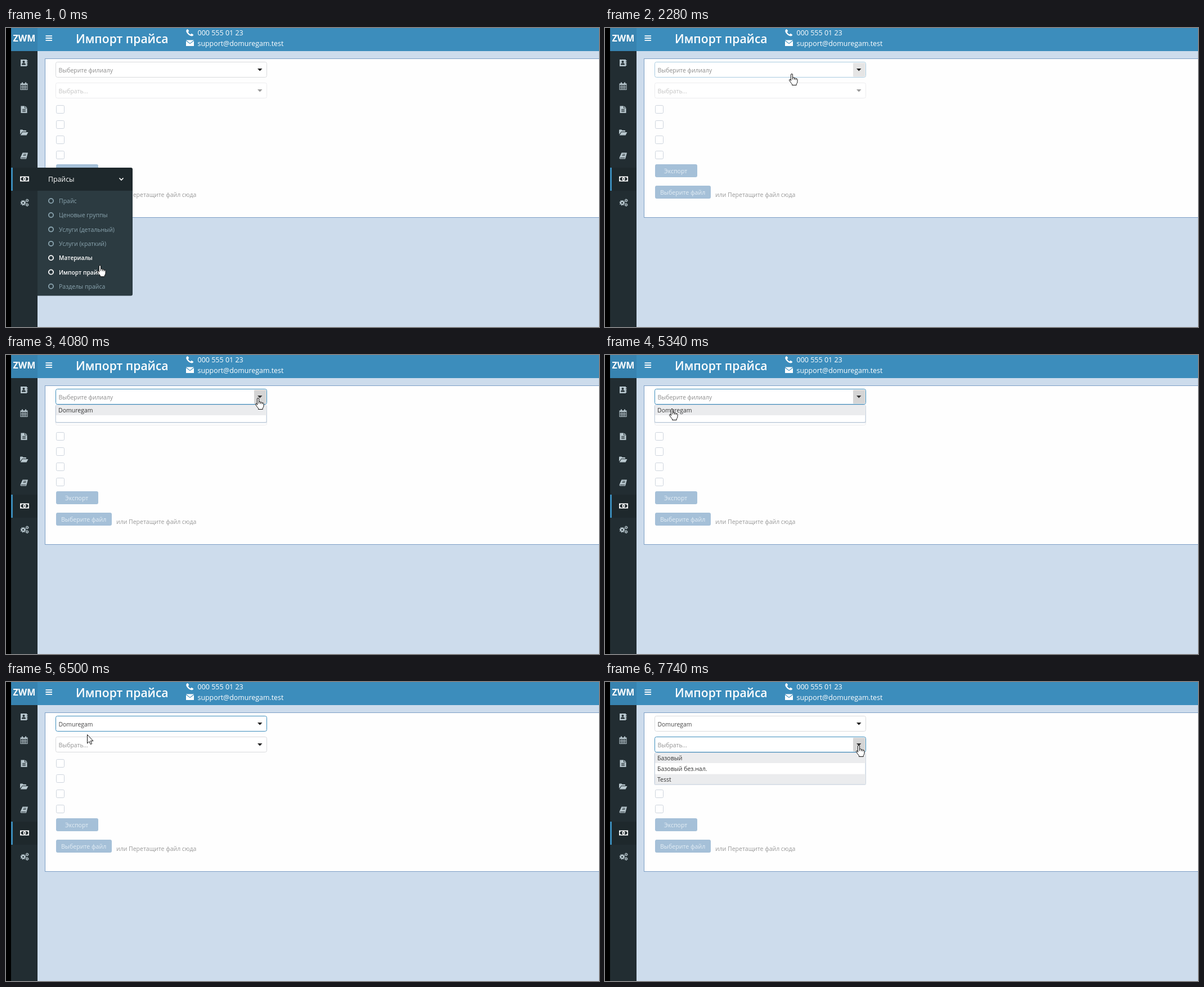
These frames come from a looping animation (1054x531 px, 8 s). An HTML page:

```html
<!DOCTYPE html>
<html lang="ru">
<head>
<meta charset="utf-8">
<title>Импорт прайса</title>
<style>
html, body { margin: 0; width: 100%; height: 100%; overflow: hidden; background: #cddcec; }
svg { display: block; width: 1054px; height: 531px; font-family: 'Open Sans', 'Noto Sans', sans-serif; }
text { white-space: pre; }
</style>
</head>
<body>
<svg id="stage" viewBox="0 0 1054 531"></svg>
<script>
const LOOP = 8000;
const BLUE = '#3c8dbc', DARK = '#222d32', DARKER = '#1e282c', PALE = '#b8c7ce', BORDER = '#d9dadd';
const BRANCH = 'Domuregam';

const rect = (x, y, w, h, fill, extra = '') =>
  `<rect x="${x}" y="${y}" width="${w}" height="${h}" fill="${fill}" ${extra}/>`;
const text = (x, y, size, fill, str, extra = '') =>
  `<text x="${x}" y="${y}" font-size="${size}" fill="${fill}" ${extra}>${str}</text>`;
const group = (id, body) => `<g id="${id}">${body}</g>`;

// Icons sit on a 14 by 14 grid; "bg" is the colour of the cut-out details.
const icons = {
  contacts: bg => `<path d="M1 1h11v12H1zM12 2.5h1.5v2H12zM12 6h1.5v2H12zM12 9.500h1.500v2H12z"/>
    <g fill="${bg}"><circle cx="6.500" cy="5" r="2"/><path d="M3 10.500q0-3 2-3h3q2 0 2 3z"/></g>`,
  calendar: bg => `<path d="M.5 2.500h13V14H.5zM3 .5h2v3H3zM9 .5h2v3H9z"/>
    <path d="M1.500 5h11v8h-11z" fill="${bg}"/><path d="M4.200 5v8M7 5v8M9.800 5v8M1.500 7.700h11M1.500 10.400h11" stroke="${PALE}" stroke-width=".9"/>`,
  page: bg => `<path d="M1.500 1H8v4h4.500v8.500h-11zM9 1l3.500 3.200H9z"/>
    <path d="M4 7h6M4 9h6M4 11h6" stroke="${bg}"/>`,
  folder: () => `<path d="M0 10.500V3q0-1 1-1h3.500l1 1.300H10q1 0 1 1V5.500H4zM.800 12l3.400-5.500H14.500L11.500 12z"/>`,
  book: bg => `<path d="M4.500 1.500H14L11 12.500H1.500Q0 12 .7 10z"/>
    <path d="M6 4.300h5M5.400 6.500h5M1.700 10.700H10.300" stroke="${bg}"/>`,
  money: bg => `<path d="M-1 2.500h16v9H-1z"/><path d="M2 4h10q0 1.500 1.500 1.500v3q-1.500 0-1.500 1.500H2q0-1.500-1.500-1.500v-3Q2 5.500 2 4z" fill="${bg}"/>
    <ellipse cx="7" cy="7" rx="2.600" ry="3"/><path d="M7 5.200v3.600" stroke="${bg}" stroke-width="1.200"/>`,
  gears: () => `<g fill="none" stroke="${PALE}"><circle cx="4.500" cy="7.500" r="2.600" stroke-width="2.200"/>
    <circle cx="4.500" cy="7.500" r="4.200" stroke-width="1.400" stroke-dasharray="1.650"/>
    <circle cx="11.600" cy="3.400" r="1.700" stroke-width="1.300"/><circle cx="11.600" cy="3.400" r="2.600" stroke-dasharray="1.360"/>
    <circle cx="11.600" cy="11" r="1.700" stroke-width="1.300"/><circle cx="11.600" cy="11" r="2.600" stroke-dasharray="1.360"/></g>`
};
const icon = (name, cx, cy, color = PALE, bg = DARK) =>
  `<g transform="translate(${cx - 7} ${cy - 7})" fill="${color}">${icons[name](bg)}</g>`;

function header() {
  return rect(0, 0, 1054, 41, BLUE) + rect(9, 0, 47, 41, '#3783b0') +
    text(12.5, 23.5, 16, '#fff', 'ZWM', 'font-weight="700"') +
    '<path d="M70.500 14.200h11.500M70.500 18h11.500M70.500 21.800h11.500" stroke="#fff" stroke-width="1.800"/>' +
    text(124, 27, 21.1, '#fff', 'Импорт прайса', 'font-weight="600"') +
    '<path d="M323 2l2.300 3.200-1.700 2q1.500 3 4.200 4.200l2-1.700 3.200 2.100q.5 2-2.800 2.600-3.700 0-7.200-3.800T320.500 4q.500-1.700 2.500-2z" fill="#fff"/>' +
    '<path d="M320 21.500h14l-7 5.500zM320 23l7 5.200 7-5.200v9h-14z" fill="#fff"/>' +
    text(340.5, 13, 12.5, '#fff', '000 555 01 23') +
    text(340.5, 32, 12.4, '#fff', 'support@domuregam.test');
}

function sidebar() {
  const rows = [['contacts', 62], ['calendar', 103], ['page', 144.5], ['folder', 185.5], ['book', 227]];
  return rect(0, 0, 9, 531, '#000') + rect(9, 41, 47, 490, DARK) +
    rect(9, 248, 47, 41, DARKER) + rect(9, 248, 3, 41, BLUE) +
    rows.map(([name, y]) => icon(name, 32, y)).join('') +
    icon('money', 33, 268, '#fff', DARKER) + icon('gears', 33, 310);
}

function select(id, y, placeholder) {
  return group(id,
    rect(88.5, y + .5, 375, 27, '#fff', `class="frame" rx="3" stroke="${BORDER}"`) +
    rect(441, y + 2, 21.5, 24.5, 'none', 'class="button" rx="1"') +
    `<path class="arrow" d="M447 ${y + 12}h8.500l-4.250 4.500z"/>` +
    text(93.500, y + 18.700, 10.400, '#8d8d8d', placeholder, 'class="value"'));
}

function panel() {
  const boxes = [137, 164, 191, 218].map(y =>
    rect(89.5, y + .5, 14, 14, '#fff', 'rx="2" stroke="#cdd4dd"')).join('');
  const button = (y, w, x, label) =>
    rect(89, y, w, 23, '#a5c0d8', 'rx="3"') + text(x, y + 16, 10.6, '#e4edf5', label);
  return rect(69.5, 54.5, 1000, 282, '#fefefe', 'stroke="#7d9fc6"') +
    select('branch', 60, 'Выберите филиалу') + select('price', 97, 'Выбрать...') + boxes +
    button(242, 75, 105, 'Экспорт') + button(280, 99, 98, 'Выберите файл') +
    text(196, 300, 10.5, '#999', 'или Перетащите файл сюда');
}

function popup(id, y, h, items, shaded) {
  const rows = items.map((label, i) => {
    const top = y + 1 + i * 18.8;
    return (shaded.includes(i) ? rect(89, top, 374, 18, '#ebecee') : '') +
      text(93, top + 13, 10.5, '#333', label);
  }).join('');
  return group(id, rect(87.5, y + 1, 376.5, h, '#b9c6d6', 'class="shade" rx="2" opacity=".55"') +
    rect(88.5, y + .5, 374.5, h - 1, '#fff', 'class="box" rx="2" stroke="#c3cfdd"') + `<g class="rows">${rows}</g>`);
}

const ITEMS = ['Прайс', 'Ценовые группы', 'Услуги (детальный)', 'Услуги (краткий)',
  'Материалы', 'Импорт прайса', 'Разделы прайса'];
function menu() {
  const rows = ITEMS.map((label, i) => {
    const y = 307 + i * 25.3;
    return `<g class="item"><circle cx="80" cy="${y}" r="4.100" fill="none" stroke-width="1.800"/>` +
      text(94, y + 4, 10.5, '', label) + '</g>';
  }).join('');
  return group('menu',
    '<path d="M56 248h166q3 0 3 3v38H56z" fill="' + DARKER + '"/>' +
    '<path d="M56 289h169v183.500q0 3-3 3H56z" fill="#2c3b41"/>' +
    text(75, 273, 12.3, '#fff', 'Прайсы') +
    '<path d="M201.500 266.500l3.500 3.500 3.500-3.500" fill="none" stroke="#fff" stroke-width="1.700"/>' + rows);
}

const HAND = 'M3.500 12.500V2q0-1.500 1.500-1.500T6.500 2v5q2.500-.8 3 .9 2-.6 2.700 1 2.600-.4 2.800 1.600v4q-.2 2.500-1.800 3.900v2.100H5.500v-1.900Q3 16 .6 12q-.3-1.800 1.200-2 1.200.5 1.700 2.500z';
const cursors =
  group('hand', `<g fill="#fff" stroke="#111" stroke-linejoin="round"><path d="${HAND}"/><path d="M6.500 7v3.500M9.500 8v2.800M12.200 9v2.300" fill="none"/></g>`) +
  group('pointer', '<path d="M.5 .5V16l3.500-3.300 2.300 5 2.300-1-2.200-5H11z" fill="#fff" stroke="#111"/>');

const stage = document.getElementById('stage');
stage.innerHTML = rect(0, 0, 1054, 531, '#cddcec') + panel() + header() + sidebar() +
  popup('branchList', 88, 32, [BRANCH], [0]) +
  popup('priceList', 125, 57, ['Базовый', 'Базовый без.нал.', 'Tesst'], [0, 2]) +
  menu() + cursors;

const el = id => document.getElementById(id);
const part = (id, name) => el(id).querySelector('.' + name);
const show = (node, on) => node.setAttribute('visibility', on ? 'inherit' : 'hidden');
const set = (node, attrs) => Object.entries(attrs).forEach(([k, v]) => node.setAttribute(k, v));
const at = (steps, t) => steps.filter(s => s[0] <= t).pop();

// Each table holds [start in ms, ...values]; a value stays until the next start.
const cursorSteps = [
  [0, 167, 421, 'hand'], [130, 167, 434, 'hand'], [265, 167, 447, 'hand'], [400, 166, 441, 'hand'],
  [700, 250, 425, 'pointer'], [860, 361, 414, 'pointer'], [1000, 367, 380, 'pointer'],
  [1140, 370, 290, 'pointer'], [1280, 361, 190, 'pointer'], [1420, 347, 119, 'pointer'],
  [1560, 337, 87, 'hand'], [1700, 333, 83, 'hand'], [1830, 332, 82, 'hand'], [2280, 332, 81, 'hand'],
  [2420, 351, 80, 'hand'], [2560, 405, 78, 'hand'], [2700, 448, 76, 'hand'],
  [4660, 436, 78, 'hand'], [4800, 370, 86, 'hand'], [4930, 270, 92, 'hand'],
  [5070, 180, 95, 'hand'], [5200, 132, 95, 'hand'], [5340, 119, 95, 'hand'],
  [5910, 119, 95, 'pointer'], [6500, 144, 93, 'pointer'], [6640, 195, 108, 'hand'],
  [6780, 265, 117, 'hand'], [6920, 338, 118, 'hand'], [7050, 402, 116, 'hand'],
  [7190, 439, 114, 'hand'], [7330, 451, 112, 'hand']
];
const itemSteps = [[0, [4, 5]], [130, [5]]];
const branchSteps = [[0, 'idle'], [1560, 'hover'], [2950, 'open'], [5770, 'focus'], [7600, 'idle']];
const priceSteps = [[0, 'off'], [6500, 'idle'], [6640, 'hover'], [7600, 'open']];
const branchListSteps = [[0, 0], [3950, 55], [4080, 32], [5770, 0]];
const priceListSteps = [[0, 0], [7600, 30], [7740, 57]];

const looks = {
  off: ['#ececee', 'none', '#999'],
  idle: [BORDER, 'none', '#222'],
  hover: ['#a9cbe0', '#e5e5e5', '#222'],
  open: [BLUE, '#d5d5d5', '#333'],
  focus: [BLUE, 'none', '#222']
};
function paintSelect(id, state) {
  const [border, button, arrow] = looks[state];
  part(id, 'frame').setAttribute('stroke', border);
  part(id, 'button').setAttribute('fill', button);
  part(id, 'arrow').setAttribute('fill', arrow);
}
function paintList(id, height, full) {
  show(el(id), height > 0);
  if (!height) return;
  part(id, 'shade').setAttribute('height', height);
  part(id, 'box').setAttribute('height', height - 1);
  show(part(id, 'rows'), height === full);
}

function render(t) {
  const [, x, y, kind] = at(cursorSteps, t);
  for (const id of ['hand', 'pointer']) {
    show(el(id), id === kind);
    el(id).setAttribute('transform', `translate(${id === 'hand' ? x - 5 : x} ${y})`);
  }
  show(el('menu'), t < 700);
  const lit = at(itemSteps, t)[1];
  document.querySelectorAll('.item').forEach((item, i) => {
    const color = lit.includes(i) ? '#fff' : '#8aa4af';
    item.firstChild.setAttribute('stroke', color);
    set(item.lastChild, { fill: color, 'font-weight': lit.includes(i) ? 600 : 400,
      'font-size': lit.includes(i) ? 10.2 : 10.5 });
  });

  const chosen = t >= 5770, price = at(priceSteps, t)[1];
  paintSelect('branch', at(branchSteps, t)[1]);
  paintSelect('price', price);
  const value = part('branch', 'value');
  value.textContent = chosen ? BRANCH : 'Выберите филиалу';
  value.setAttribute('fill', chosen ? '#444' : '#8d8d8d');
  part('price', 'value').setAttribute('fill', price === 'off' ? '#c4c4c4' : '#929292');
  paintList('branchList', at(branchListSteps, t)[1], 32);
  paintList('priceList', at(priceListSteps, t)[1], 57);
}

const start = performance.now();
function tick() {
  render((performance.now() - start) % LOOP);
  requestAnimationFrame(tick);
}
tick();
</script>
</body>
</html>
```
